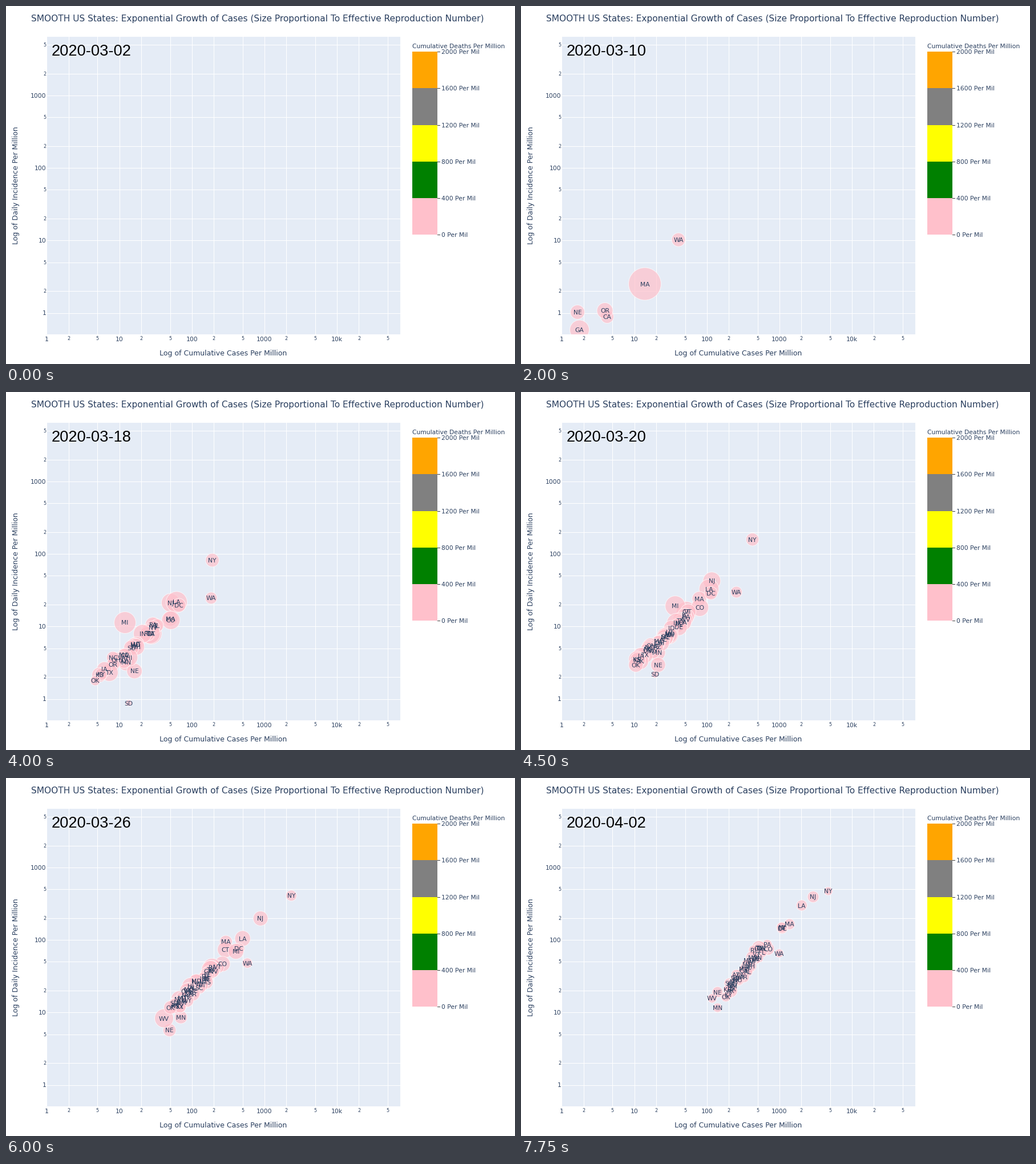
A matplotlib script for the animation above (8 s loop, 892x628 px).

```python
import numpy as np
import matplotlib.pyplot as plt
from matplotlib.animation import FuncAnimation
from matplotlib.patches import Rectangle

W, H, DPI = 892, 628, 100
DAYS = 32
PX = 72 / DPI                      # points per pixel
LEFT, RIGHT, TOP, BOTTOM = 71, 690.5, 53.5, 576
X_ONE, Y_ONE, DECADE = 71.4, 538.5, 127.2
INK = "#2a3f5f"
SMALL, AXIS, TITLE = 10.7, 12.5, 15.41

plt.rcParams["font.family"] = "DejaVu Sans"
fig = plt.figure(figsize=(W / DPI, H / DPI), dpi=DPI, facecolor="white")
ax = fig.add_axes([0, 0, 1, 1])    # axes in pixels, y downwards
ax.set(xlim=(0, W), ylim=(H, 0))
ax.axis("off")
rng = np.random.default_rng(4)


def label(x, y, text, size=SMALL, ha="center", **kw):
    kw = {"color": INK, "va": "baseline", **kw}
    return ax.text(x, y, text, fontsize=size * PX, ha=ha, **kw)


def draw_grid():
    names = {0: "1", 1: "10", 2: "100", 3: "1000", 4: "10k"}
    for power in range(-1, 5):
        for digit in (1, 2, 5):
            step = DECADE * (power + np.log10(digit))
            x, y = X_ONE + step, Y_ONE - step
            major = digit == 1
            text = names.get(power, "") if major else str(digit)
            size = SMALL if major else 8
            if LEFT <= x <= RIGHT:
                ax.plot([x, x], [TOP, BOTTOM], color="white", lw=PX, zorder=1)
                label(x, 588 if major else 585.5, text, size)
            if TOP <= y <= BOTTOM:
                ax.plot([LEFT, RIGHT], [y, y], color="white", lw=PX, zorder=1)
                label(70.3, y + (4 if major else 3), text, size, "right")


def draw_colorbar():
    bar_top, step = 80, 64.27
    for i, color in enumerate(("orange", "gray", "yellow", "green", "pink")):
        ax.add_patch(Rectangle((712, bar_top + i * step), 44, step, fc=color, lw=0))
    for i in range(6):
        y = bar_top + i * step
        ax.plot([756, 760], [y, y], color="#444444", lw=PX)
        label(763, y + 4, f"{2000 - 400 * i} Per Mil", ha="left")
    label(712, 73.5, "Cumulative Deaths Per Million", ha="left")


plot = ax.add_patch(Rectangle((LEFT, TOP), RIGHT - LEFT, BOTTOM - TOP,
                              fc="#e5ecf6", lw=0, zorder=0))
draw_grid()
draw_colorbar()
label(441.2, 27, "SMOOTH US States: Exponential Growth of Cases "
      "(Size Proportional To Effective Reproduction Number)", TITLE)
label(380.8, 613, "Log of Cumulative Cases Per Million", AXIS)
label(17.3, 315, "Log of Daily Incidence Per Million", AXIS, rotation=90, va="center")
date = label(79.2, 87, "", 27.3, "left", color="black", family="Liberation Sans", zorder=6)

# Early sightings away from the later path: day, x, y, radius
SEEN = {
    "MA": (8, 217, 487.5, 28.5), "NE": (8, 99, 537, 12.5), "OR": (8, 147, 534.5, 14),
    "CA": (8, 151, 545, 11.5), "GA": (8, 102.5, 568, 17),
    "WI": (12, 157, 494.5, 34), "KY": (12, 150, 564, 12), "OK": (12, 75, 562.5, 9),
}
tracks = {}


def add_track(name, points, lead):
    """Store a path; lead days before it drift in from the lower left."""
    if name in SEEN:
        points = [SEEN[name]] + [p for p in points if p[0] > SEEN[name][0]]
    day, x, y, r = points[0]
    entry = (day - lead, x - 16 * lead, y + 15 * lead, r + 2 * lead)
    tracks[name] = np.array([entry, *points], float).T


def leader(name, day, start, end, ease=(1.5, 1.5), lead=2):
    """Ease out from start to end, each an (x, y, radius)."""
    start, end = np.array(start), np.array(end)
    power = np.array([*ease, 1])
    points = []
    for d in range(day, DAYS):
        left = 1 - (d - day) / (DAYS - 1 - day)
        points.append((d, *(end + (start - end) * left ** power)))
    add_track(name, points, lead)


leader("WA", 8, (276, 410, 12), (452.5, 307.5, 7.5), lead=6)
leader("NY", 12, (254.5, 409, 13), (538.5, 198.5, 7.5), (2, 3.3))
leader("NJ", 12, (186, 461, 18), (512, 208.5, 10), (1.6, 1.9))
leader("LA", 16, (299, 368.5, 18.5), (492, 223.5, 9.5), (1.2, 1.2))
leader("MA", 12, (239.5, 483, 14), (470.5, 256.5, 9.5), (1, 2))
leader("DC", 16, (303, 374, 12), (457.5, 264.5, 8))
leader("CT", 16, (254, 423.5, 19), (457.5, 263, 10), (1.35, 1.9))
leader("MI", 16, (208.5, 404.5, 19), (457, 262, 9), (2, 1.6))
leader("CO", 12, (237, 452, 17.5), (433, 299.5, 11), (1.3, 1.75))
leader("VT", 16, (260, 410.5, 14), (413, 309, 9), (1.7, 2))
leader("MN", 12, (147, 514, 17), (344.5, 403, 8), (1.65, 1.9))
leader("NE", 12, (195, 510, 14.5), (344.5, 375.5, 9.5), (0.95, 0.7))
leader("SD", 16, (215, 545.5, 5.5), (365, 360, 9), (1, 2.2))
leader("WV", 24, (277, 421.5, 16.5), (335, 386.5, 8), lead=1)

# The pack lies along a moving diagonal, listed from its upper to its lower end
PACK = ("PA IL NV TN GA FL IN RI DE ID MS UT MD WI NH SC ME AL HI MO CA AR VA AZ "
        "OH NC WY ND MT OR NM TX IA AK KS KY OK").split()
BY_DAY_12 = "PA IL NV TN GA FL IN UT MD WI NH SC HI CA NC OR TX KY OK".split()
BY_DAY_16 = "MO VA AZ OH IA KS".split()
KEY_DAYS = (8, 12, 16, 20, 24, 31)
UPPER = ((150, 200, 262, 318, 366, 425), (520, 480, 412, 375, 335, 294))
LOWER = ((95, 100, 160, 240, 293, 360), (570, 565, 502, 448, 406, 380))
RADIUS = (14, 13, 13, 14, 12, 9)


def add_pack():
    for i, name in enumerate(PACK):
        latest = 12 if name in BY_DAY_12 else 16 if name in BY_DAY_16 else 20
        start = latest - rng.integers(0, 3)
        points = []
        for day in (start, *(d for d in KEY_DAYS if d > start)):
            place = i / (len(PACK) - 1) + rng.normal(0, 0.03)
            across = rng.normal(0, 2.5)
            x, y = (np.interp(day, KEY_DAYS, up) * (1 - place)
                    + np.interp(day, KEY_DAYS, low) * place + across
                    for up, low in zip(UPPER, LOWER))
            r = np.interp(day, KEY_DAYS, RADIUS) + rng.normal(0, 1.8)
            points.append((day, x, y, r))
        add_track(name, points, lead=1)


add_pack()
bubbles = ax.scatter([], [], c="pink", edgecolors="white", linewidths=PX, alpha=0.7, zorder=3)
bubbles.set_clip_path(plot)
tags = {name: label(0, 0, name, zorder=5) for name in tracks}
for tag in tags.values():
    tag.set_clip_path(plot)


def update(day):
    month, dom = (3, day + 2) if day < 30 else (4, day - 29)
    date.set_text(f"2020-{month:02d}-{dom:02d}")
    spots, sizes = [], []
    for name, (days, *values) in tracks.items():
        alive = day >= days[0]
        tags[name].set_visible(alive)
        if alive:
            x, y, r = (np.interp(day, days, v) for v in values)
            tags[name].set_position((x, y + 4))
            spots.append((x, y))
            sizes.append((2 * r * PX) ** 2)
    bubbles.set_offsets(np.array(spots).reshape(-1, 2))
    bubbles.set_sizes(sizes)
    return [bubbles, date, *tags.values()]


anim = FuncAnimation(fig, update, frames=DAYS, interval=250, repeat=True, repeat_delay=0)
plt.show()
```
